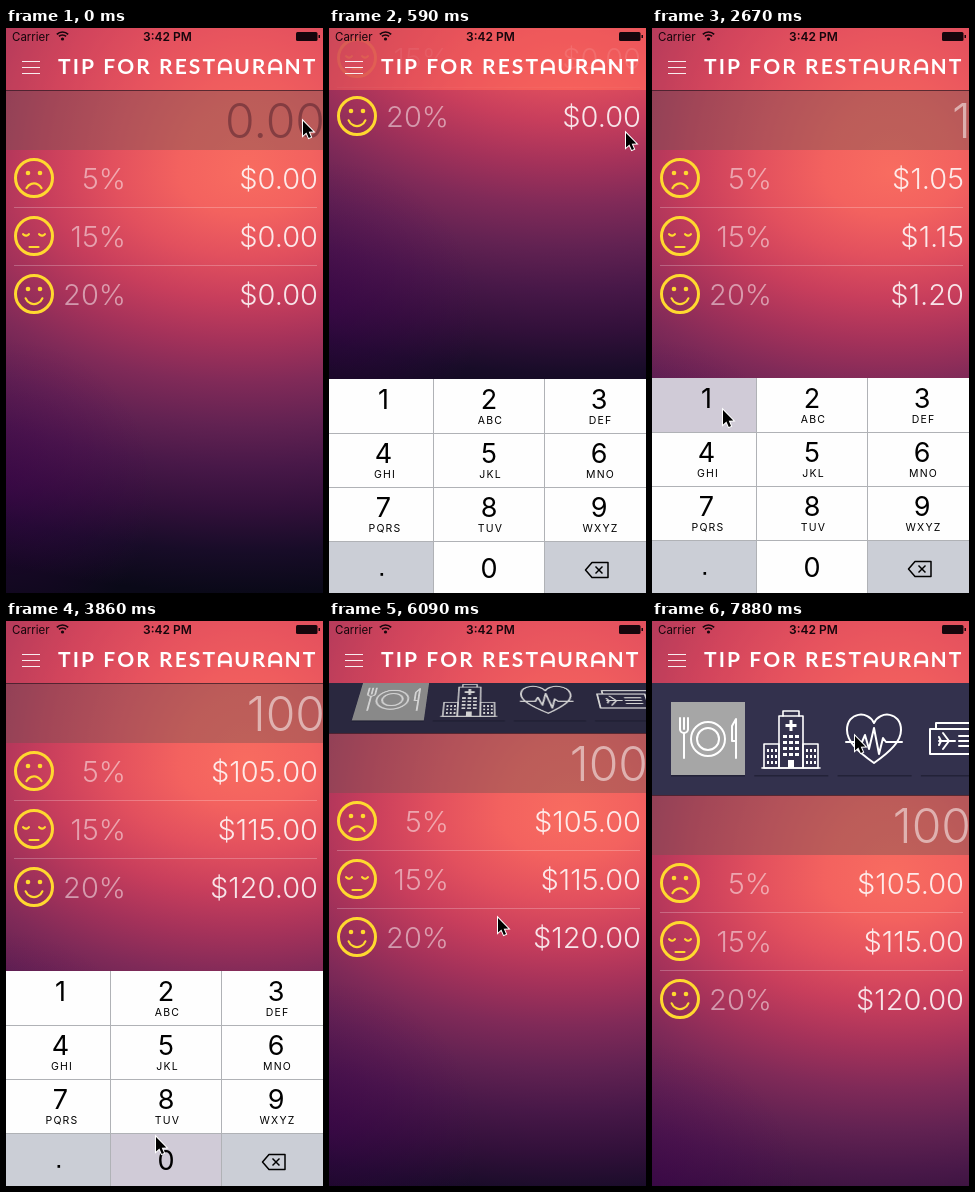
These frames come from a looping animation (317 by 565 pixels, 8000 ms). An HTML page with a canvas:

```html
<!DOCTYPE html>
<html lang="en">
<head>
<meta charset="utf-8">
<title>Tip calculator</title>
<style>
html, body { margin: 0; width: 317px; height: 565px; overflow: hidden; background: #0a0918; }
canvas { display: block; }
</style>
</head>
<body>
<canvas id="stage" width="317" height="565"></canvas>
<script>
const W = 317, H = 565, LOOP = 8000, STEP = 148.6;
const BAR = 62, MENU = 112, DEPTH = 550;
const FONT = 'Inter, Roboto, sans-serif';
const ctx = document.getElementById('stage').getContext('2d');

// Tracks: [step, value...], linear between keys
const scrollKeys = [[0, 0], [1, -55], [2, -140], [3, -175], [4, -178], [5, -150], [6, -70], [7, -15], [8, 0],
  [37, 0], [41, 50], [44, 105], [45, 112]];
const padKeys = [[0, 565], [1, 500], [2, 400], [3, 357], [4, 351], [5, 350], [33, 350], [34, 465], [35, 545], [36, 565]];
const cursorKeys = [[0, 297, 93], [4, 297, 105], [8, 295, 113], [12, 295, 113], [17, 71, 382], [18, 71, 382],
  [20, 150, 516], [26, 150, 516], [31, 178, 290], [34, 178, 290], [37, 172, 247], [41, 169, 297],
  [44, 166, 352], [45, 166, 352], [49, 140, 115], [50, 142, 118], [51, 142, 118], [52, 172, 120], [53, 203, 115]];

function track(keys, n) {
  let i = 0;
  while (i < keys.length - 1 && keys[i + 1][0] <= n) i++;
  const a = keys[i], b = keys[i + 1];
  if (!b) return a.slice(1);
  const k = (n - a[0]) / (b[0] - a[0]);
  return a.slice(1).map((v, j) => Math.round(v + (b[j + 1] - v) * k));
}

function text(c, str, x, y, font, color, align = 'left', spacing = 0) {
  c.font = font;
  c.fillStyle = color;
  c.textAlign = align;
  c.letterSpacing = spacing + 'px';
  c.fillText(str, x, y);
}

function poly(c, pts, close) {
  c.beginPath();
  pts.forEach(p => c.lineTo(p[0], p[1]));
  if (close) c.closePath();
}

function line(c, ...pts) { poly(c, pts); c.stroke(); }

function circle(c, x, y, r, from = 0, to = 2 * Math.PI) {
  c.beginPath();
  c.arc(x, y, r, from, to);
}

function box(c, color, x, y, w, h) { c.fillStyle = color; c.fillRect(x, y, w, h); }

function wallpaper(off) {
  const stops = ['248,108,96', '243,98,95', '226,80,94', '200,62,92', '165,50,90', '128,42,88',
    '98,34,82', '72,24,72', '50,16,58', '24,12,40', '10,9,24'];
  const g = ctx.createRadialGradient(0, 0, 0, 0, 0, 420);
  stops.forEach((s, i) => g.addColorStop(i / 10, `rgb(${s})`));
  ctx.fillStyle = g;
  for (const up of [true, false]) {
    ctx.save();
    ctx.translate(240, 145 + off);
    ctx.scale(1.6, up ? 1.8 : 1);
    ctx.fillRect(-300, up ? -500 : 0, 600, up ? 500 : 800);
    ctx.restore();
  }
  const glow = ctx.createRadialGradient(0, 460 + off, 0, 0, 460 + off, 150);
  glow.addColorStop(0, 'rgba(75,0,90,.4)');
  glow.addColorStop(1, 'rgba(75,0,90,0)');
  ctx.fillStyle = glow;
  ctx.fillRect(0, 300 + off, 170, 320);
}

function face(kind, y) {
  const x = 28, PI = Math.PI;
  ctx.strokeStyle = ctx.fillStyle = '#ffd92f';
  ctx.lineCap = 'round';
  ctx.lineWidth = 3;
  circle(ctx, x, y, 18.5);
  ctx.stroke();
  ctx.lineWidth = 2.2;
  for (const side of [-1, 1]) {
    if (kind === 1) {
      circle(ctx, x + side * 8, y - 4, 3.6, PI * .2, PI * .8);
      ctx.stroke();
    } else {
      circle(ctx, x + side * 6, y - 5, 2.3);
      ctx.fill();
    }
  }
  if (kind === 0) circle(ctx, x, y + 14, 8.5, PI * 1.15, PI * 1.85);
  if (kind === 1) poly(ctx, [[x - 4.5, y + 11], [x + 4.5, y + 11]]);
  if (kind === 2) circle(ctx, x, y + 1, 9, PI * .12, PI * .88);
  ctx.stroke();
  ctx.lineCap = 'butt';
}

function rows(off, value) {
  [5, 15, 20].forEach((pct, i) => {
    const y = 150 + 58 * i + off;
    face(i, y);
    text(ctx, pct + '%', 120, y + 11, `300 29px ${FONT}`, 'rgba(255,255,255,.5)', 'right');
    const total = '$' + (value * (100 + pct) / 100).toFixed(2);
    text(ctx, total, 312, y + 11, `300 29px ${FONT}`, 'rgba(255,255,255,.86)', 'right');
    if (i < 2) box(ctx, 'rgba(255,255,255,.24)', 8, y + 29, 303, 1);
  });
}

function field(off, value) {
  box(ctx, 'rgba(105,83,80,.4)', 0, BAR + off, W, 60);
  box(ctx, 'rgba(50,22,34,.7)', 0, BAR + off, W, 1);
  text(ctx, value ? String(value) : '0.00', 319, 110 + off, `300 48px ${FONT}`,
    value ? 'rgba(255,255,255,.52)' : 'rgba(85,35,45,.55)', 'right');
}

function cutlery(c) {
  for (const r of [17, 11]) { circle(c, 56, 56, r); c.stroke(); }
  for (const x of [28, 32, 36]) line(c, [x, 35], [x, 46]);
  circle(c, 32, 46, 4, 0, Math.PI);
  c.stroke();
  line(c, [32, 50], [32, 75]);
  poly(c, [[84, 75], [84, 36], [80, 43], [80, 58], [84, 58]]);
  c.stroke();
}

function hospital(c) {
  c.strokeRect(127, 33, 24, 52);
  line(c, [131, 33], [131, 28], [147, 28], [147, 33]);
  box(c, '#fff', 137.5, 37, 3, 11);
  box(c, '#fff', 133.5, 41, 11, 3);
  for (const x of [112, 151]) {
    c.strokeRect(x, 61, 15, 24);
    for (let i = 0; i < 9; i++) box(c, '#fff', x + 3 + i % 3 * 4, 66 + (i / 3 | 0) * 6, 2, 3);
  }
  for (let i = 0; i < 12; i++) box(c, '#fff', 131 + i % 3 * 6, 52 + (i / 3 | 0) * 6, 4, 3);
  box(c, '#fff', 136, 77, 6, 8);
  line(c, [110, 85], [168, 85]);
}

function heart(c) {
  c.beginPath();
  c.moveTo(222, 80);
  c.bezierCurveTo(205, 68, 195, 58, 195, 47);
  c.bezierCurveTo(195, 29, 216, 27, 222, 40);
  c.bezierCurveTo(228, 27, 249, 29, 249, 47);
  c.bezierCurveTo(249, 58, 239, 68, 222, 80);
  c.stroke();
  line(c, [194, 59], [210, 59], [213, 52], [217, 66], [222, 45], [227, 71], [231, 55], [234, 59], [250, 59]);
}

function tickets(c) {
  line(c, [284, 46], [284, 40], [336, 40], [336, 65], [330, 65]);
  c.strokeRect(278, 46, 52, 25);
  line(c, [287, 58], [303, 58]);
  line(c, [291, 50], [297, 58], [291, 66]);
  line(c, [287, 54], [289, 58], [287, 62]);
  for (const y of [53, 58, 63]) line(c, [307, y], [324, y]);
}

const PADX = 40;
const strip = document.createElement('canvas');
strip.width = W + 2 * PADX;
strip.height = MENU + 1;
(function paintStrip() {
  const c = strip.getContext('2d');
  box(c, '#33314d', 0, 0, strip.width, strip.height);
  c.translate(PADX, 0);
  box(c, '#a6a6a6', 19, 19, 74, 74);
  for (let i = 0; i < 4; i++) box(c, '#232238', 19 + i * 83.3, 92, 74, 1.5);
  c.strokeStyle = '#fff';
  c.lineJoin = c.lineCap = 'round';
  c.lineWidth = 2;
  cutlery(c);
  c.lineWidth = 1.6;
  hospital(c);
  c.lineWidth = 2;
  heart(c);
  tickets(c);
})();

// Menu hinged on its lower edge, folding back under the bar
function menu(off) {
  if (off <= 0) return;
  box(ctx, '#2b2a40', 0, BAR, W, off);
  const open = off / MENU, a = (1 - open) * Math.PI / 2, sin = Math.sin(a), cos = Math.cos(a);
  const height = u => u / (cos - u * sin / DEPTH);
  for (let u = 0; u < off; u++) {
    const lo = height(u), hi = height(u + 1);
    if (hi > strip.height || hi < lo) break;
    const w = strip.width / (1 + (lo + hi) / 2 * sin / DEPTH);
    ctx.drawImage(strip, 0, MENU - hi, strip.width, hi - lo, (W - w) / 2, BAR + off - u - 1, w, 1);
  }
  box(ctx, `rgba(0,0,0,${.32 * (1 - open)})`, 0, BAR, W, off);
}

function title() {
  const font = '700 21px Lato, "Open Sans", sans-serif', gap = 2.1;
  let x = 52;
  ctx.strokeStyle = '#fff';
  ctx.lineWidth = 2.5;
  'TIP FOR REST|A|UR|A|NT'.split('|').forEach(part => {
    if (part === 'A') {
      ctx.beginPath();
      ctx.moveTo(x + 2, 46);
      ctx.lineTo(x + 2, 38);
      ctx.arc(x + 7.7, 38, 5.7, Math.PI, 0);
      ctx.lineTo(x + 13.4, 46);
      ctx.moveTo(x + 2, 41);
      ctx.lineTo(x + 13.4, 41);
      ctx.stroke();
      x += 17;
    } else {
      text(ctx, part, x, 46, font, '#fff', 'left', gap);
      x += ctx.measureText(part).width;
    }
  });
}

function statusBar() {
  const ink = '#16060c';
  text(ctx, 'Carrier', 6, 12.5, `400 11.5px ${FONT}`, ink);
  text(ctx, '3:42 PM', 161.5, 12.5, `600 12px ${FONT}`, ink, 'center');
  ctx.strokeStyle = ink;
  ctx.lineWidth = 1.7;
  for (const r of [8, 5]) {
    circle(ctx, 56.5, 12, r, Math.PI * 1.25, Math.PI * 1.75);
    ctx.stroke();
  }
  circle(ctx, 56.5, 11, 1.6);
  ctx.fillStyle = ink;
  ctx.fill();
  ctx.beginPath();
  ctx.roundRect(290, 4, 21.5, 9, 1.5);
  ctx.fill();
  box(ctx, ink, 312.5, 7, 1.5, 3);
}

function header(off, value) {
  ctx.save();
  ctx.beginPath();
  ctx.rect(0, 0, W, BAR);
  ctx.clip();
  wallpaper(0);
  box(ctx, 'rgba(240,90,92,.25)', 0, 0, W, BAR);
  if (off < 0) {
    box(ctx, `rgba(255,100,85,${-off / 178 * .3})`, 0, 0, W, BAR);
    ctx.globalAlpha = .13;
    rows(off, value);
    ctx.globalAlpha = 1;
  }
  ctx.restore();
  statusBar();
  for (const y of [33, 39, 45]) box(ctx, 'rgba(255,255,255,.9)', 16, y, 18, 1);
  title();
}

function keypad(top, pressed) {
  if (top >= H) return;
  const edge = [0, 105, 216, W], mid = [54.5, 160, 270];
  const labels = ['', 'ABC', 'DEF', 'GHI', 'JKL', 'MNO', 'PQRS', 'TUV', 'WXYZ'];
  ctx.save();
  ctx.translate(0, top);
  box(ctx, '#fefefe', 0, 0, W, 215);
  for (let i = 0; i < 12; i++) {
    const col = i % 3, y = (i / 3 | 0) * 54, x = mid[col];
    const key = i < 9 ? String(i + 1) : ['.', '0', ''][col];
    const fill = key === pressed ? '#d0cbd7' : i === 9 || i === 11 ? '#cbced6' : '';
    if (fill) box(ctx, fill, edge[col], y, edge[col + 1] - edge[col], 54);
    if (key === '.') box(ctx, '#000', 51.5, 194, 2.6, 2.8);
    else text(ctx, key, x, y + (i < 9 ? 30 : 37), `400 27px ${FONT}`, '#000', 'center');
    if (labels[i]) text(ctx, labels[i], x + 1.5, y + 45, `400 10.5px ${FONT}`, '#000', 'center', 1.2);
  }
  for (const y of [54, 108, 162]) box(ctx, '#b0b2b6', 0, y, W, 1);
  for (const x of [104, 215]) box(ctx, '#b0b2b6', x, 0, 1, 215);
  ctx.strokeStyle = '#000';
  ctx.lineWidth = 1.5;
  ctx.lineJoin = 'round';
  poly(ctx, [[256.5, 191], [263, 183.5], [279, 183.5], [279, 198.5], [263, 198.5]], true);
  ctx.stroke();
  line(ctx, [266.5, 187.5], [273.5, 194.5]);
  line(ctx, [273.5, 187.5], [266.5, 194.5]);
  ctx.restore();
}

function cursor(x, y) {
  ctx.save();
  ctx.translate(x, y);
  poly(ctx, [[0, 0], [0, 14.5], [3.4, 11.5], [5.8, 17], [8, 16], [5.7, 10.7], [10.3, 10.5]], true);
  ctx.lineJoin = 'miter';
  ctx.strokeStyle = '#fff';
  ctx.lineWidth = 2;
  ctx.stroke();
  ctx.fillStyle = '#000';
  ctx.fill();
  ctx.restore();
}

function draw(t) {
  // The screen refreshes in coarse steps
  const n = Math.floor((t + 6) / STEP);
  const [off] = track(scrollKeys, n);
  const value = n < 18 ? 0 : n < 22 ? 1 : n < 26 ? 10 : 100;
  const pressed = n === 17 || n === 18 ? '1' : n === 21 || n === 22 || n === 25 || n === 26 ? '0' : null;
  wallpaper(off);
  field(off, value);
  rows(off, value);
  menu(off);
  header(off, value);
  keypad(track(padKeys, n)[0], pressed);
  cursor(...track(cursorKeys, n));
}

const start = performance.now();
function tick(now) {
  draw(Math.max(0, now - start) % LOOP);
  requestAnimationFrame(tick);
}
draw(0);
requestAnimationFrame(tick);
</script>
</body>
</html>
```
